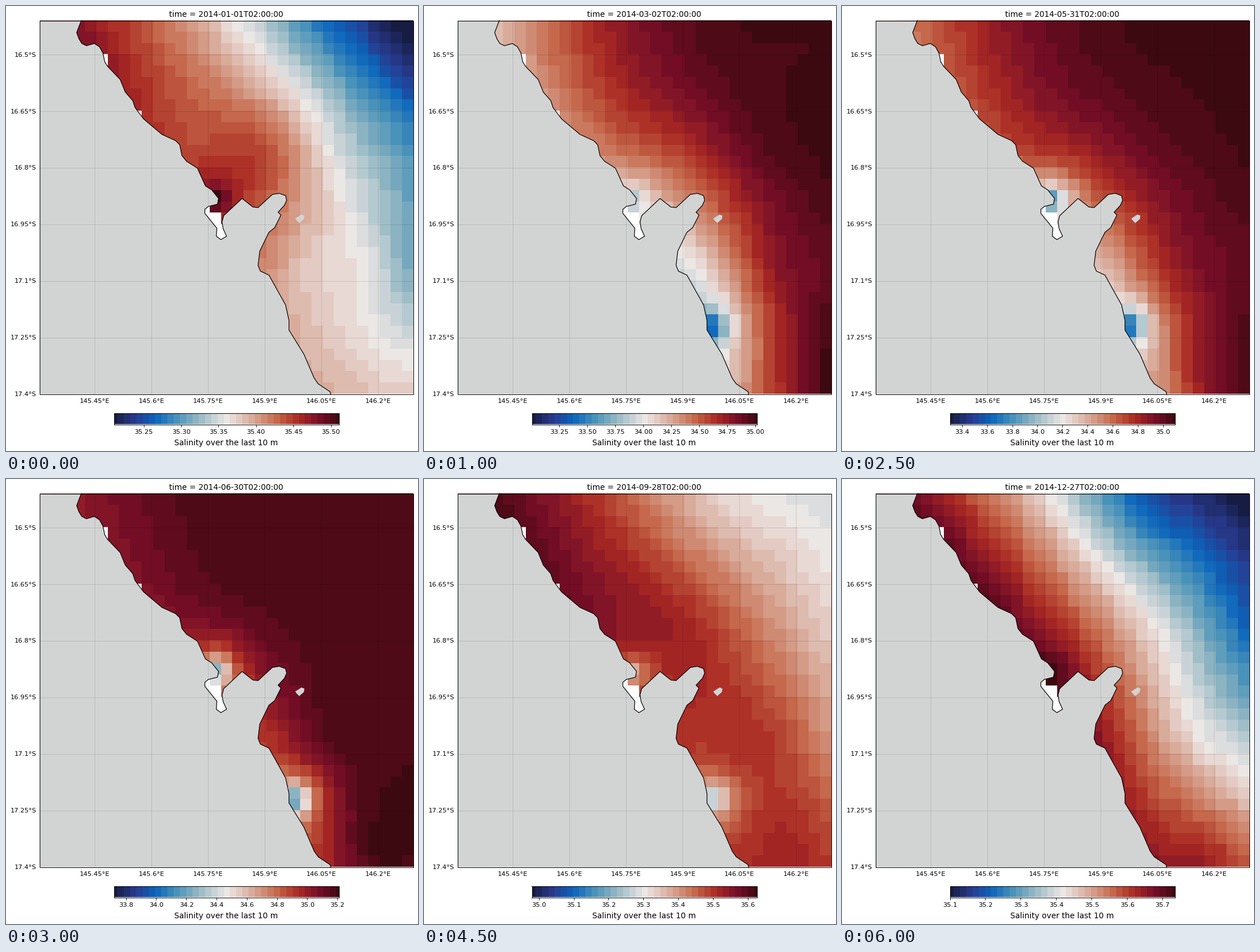
Recreate the animation shown at these times as a matplotlib script. Size 720 px wide and 778 px high, loop 6.5 s.

```python
import numpy as np
import matplotlib.pyplot as plt
from matplotlib.animation import FuncAnimation
from matplotlib.colors import LinearSegmentedColormap
from matplotlib.path import Path

W, H, DPI = 720, 778, 100
PT = 72 / DPI                      # points per pixel
LEFT, RIGHT, TOP, BOTTOM = 58.5, 711.5, 25.5, 678.5
N = 33                             # cells per side
DEGREE = (RIGHT - LEFT) / 0.99     # pixels per degree
SHADES = 36
FRAMES, INTERVAL = 13, 500
LAND = "#d2d4d3"
START = np.datetime64("2014-01-01T02:00:00")

plt.rcParams["font.family"] = "DejaVu Sans"

# Diverging navy - white - maroon map
COOL = ["#171c42", "#293a8f", "#0b66bd", "#4590b9", "#8eb5c2", "#d2d8db"]
WARM = ["#e6d2cc", "#d59d89", "#c46548", "#ac2b24", "#780e28", "#3c0911"]
stops = [(i / 11, c) for i, c in enumerate(COOL)]
stops += [(0.5, "#ece8e6")]
stops += [((i + 6) / 11, c) for i, c in enumerate(WARM)]
CMAP = LinearSegmentedColormap.from_list("balance", stops, N=256)
CMAP.set_bad("white")

COAST = np.array([
    (131, 25), (123, 46), (127, 57), (132, 65), (140, 69), (154, 65), (163, 71), (169, 82),
    (172, 97), (177, 105), (199, 128), (208, 150), (221, 165), (225, 177), (240, 197),
    (272, 224), (296, 235), (303, 242), (307, 261), (315, 271), (334, 283), (348, 314),
    (359, 321), (371, 336), (369, 346), (353, 350), (347, 355), (347, 362), (368, 388),
    (367, 402), (375, 408), (385, 402), (379, 389), (377, 377), (380, 366), (412, 336),
    (431, 351), (440, 352), (465, 329), (477, 327), (488, 331), (490, 339), (486, 348),
    (475, 360), (480, 365), (469, 387), (459, 395), (443, 428), (440, 453), (444, 463),
    (459, 470), (488, 522), (494, 549), (494, 566), (520, 608), (538, 650), (545, 660),
    (566, 674), (567, 679)]) + 0.5
ISLAND = np.array([(505, 371), (516, 364), (521, 366), (520, 372), (512, 379), (507, 374)]) + 0.5
MAINLAND = np.vstack([COAST, (LEFT, BOTTOM), (LEFT, TOP)])

# Cells without data: two slivers and the inlet
empty = np.zeros((N, N), bool)
empty[3, 5] = empty[8, 8] = empty[16, 14] = True
empty[17, 13:16] = True
empty[18:21, 13:17] = True

# A cell holds water when any of its corners is off the land
edge = np.linspace(0, RIGHT - LEFT, N + 1)
corners = np.stack(np.meshgrid(LEFT + edge, TOP + edge), -1).reshape(-1, 2)
wet = ~Path(MAINLAND).contains_points(corners).reshape(N + 1, N + 1)
ocean = (wet[1:, 1:] | wet[:-1, 1:] | wet[1:, :-1] | wet[:-1, :-1]) & ~empty

# Control net: four rows, four steps from the shore to the eastern edge
rows = np.repeat([1, 11, 21, 31], 4)
shore = 3 + 1.03 * rows - 0.01 * rows ** 2
POINTS = np.c_[shore + (32 - shore) * np.tile(np.arange(4) / 3, 4), rows]
GRID = np.stack(np.meshgrid(np.arange(N), np.arange(N)), -1).reshape(-1, 2).astype(float)


def kernel(a, b):
    d2 = ((a[:, None] - b[None]) ** 2).sum(-1)
    return d2 * np.log(d2 + 1e-9)


def spline(values):
    """Thin-plate surface through the control net."""
    n = len(POINTS)
    base = np.c_[np.ones(n), POINTS]
    system = np.block([[kernel(POINTS, POINTS), base], [base.T, np.zeros((3, 3))]])
    w = np.linalg.solve(system, np.r_[values, np.zeros(3)])
    return kernel(GRID, POINTS) @ w[:n] + np.c_[np.ones(len(GRID)), GRID] @ w[n:]


def plume(col, row):
    return np.exp(-np.hypot(GRID[:, 0] - col, GRID[:, 1] - row) / 1.4)


INLET, RIVER = plume(15, 15.3), plume(22, 26.5)
steps, lows, salts = [], [], []


def key(step, low, high, inlet, river, *net):
    """Salinity at one step; net, inlet and river are percent of the colour range."""
    level = spline(np.ravel(net)) + inlet * INLET + river * RIVER
    steps.append(step)
    lows.append(low)
    salts.append(low + (high - low) * np.clip(level / 100, 0, 1).reshape(N, N))


key(0, 35.21, 35.524, 26, 0,
    (84, 62, 30, 0), (73, 73, 45, 27), (62, 52, 48, 32), (56, 55, 51, 51))
key(1, 33.54, 35.295, 0, -60,
    (68, 81, 87, 87), (73, 78, 90, 91), (66, 81, 93, 93), (85, 92, 97, 100))
key(3, 32.47, 34.926, -35, -35,
    (52, 82, 98, 100), (64, 75, 90, 98), (37, 59, 80, 87), (50, 66, 78, 92))
key(6, 33.72, 35.224, -62, -68,
    (87, 96, 97, 97), (91, 95, 97, 97), (83, 95, 97, 97), (85, 95, 99, 98))
key(8, 34.70, 35.523, -58, -72,
    (98, 94, 78, 73), (95, 96, 88, 78), (88, 94, 90, 78), (96, 97, 94, 90))
key(10, 35.26, 35.737, 5, -18,
    (93, 49, 17, 2), (79, 62, 36, 15), (68, 61, 55, 45), (55, 61, 62, 58))
key(12, 35.10, 35.735, 12, 0,
    (91, 61, 20, 1), (89, 68, 44, 18), (83, 66, 51, 41), (84, 84, 80, 72))


def shade(values):
    return np.round(values * SHADES) / SHADES


def state(step):
    """Colour range and shaded field, with salinity blended between keys."""
    k = min(np.searchsorted(steps, step, side="right"), len(steps) - 1) - 1
    t = (step - steps[k]) / (steps[k + 1] - steps[k])
    low = (1 - t) * lows[k] + t * lows[k + 1]
    salt = (1 - t) * salts[k] + t * salts[k + 1]
    high = salt[ocean].max()
    level = np.clip((salt - low) / (high - low), 0, 1)
    return low, high, np.ma.masked_array(shade(level), empty)


fig = plt.figure(figsize=(W / DPI, H / DPI), dpi=DPI, facecolor="white")
ax = fig.add_axes([0, 0, 1, 1])
ax.axis("off")

mesh = ax.imshow(np.zeros((N, N)), cmap=CMAP, vmin=0, vmax=1, aspect="auto",
                 interpolation="nearest", extent=(LEFT, RIGHT, BOTTOM, TOP))
ax.set_xlim(0, W)
ax.set_ylim(H, 0)

for land in (MAINLAND, ISLAND):
    ax.fill(*land.T, color=LAND, lw=0)
ax.plot(*COAST.T, color="black", lw=1.2 * PT, solid_joinstyle="round")

TICK, TITLE = 11.35 * PT, 13.6 * PT
CENTER = (LEFT + RIGHT) / 2
grid = dict(color="black", alpha=0.13, lw=0.9 * PT)


def degrees(value, side):
    return f"{value:.2f}".rstrip("0") + "°" + side


for i in range(6):
    x = 155.3 + 0.15 * i * DEGREE
    ax.plot([x, x], [TOP, BOTTOM], **grid)
    ax.text(x, 694.5, degrees(145.45 + 0.15 * i, "E"), size=TICK, ha="center")
for i in range(7):
    y = BOTTOM - 0.15 * i * DEGREE
    if i:
        ax.plot([LEFT, RIGHT], [y, y], **grid)
    ax.text(53.3, y + 3.7, degrees(17.4 - 0.15 * i, "S"), size=TICK, ha="right")
ax.plot([LEFT, RIGHT, RIGHT, LEFT, LEFT], [TOP, TOP, BOTTOM, BOTTOM, TOP],
        color="black", lw=0.95 * PT, solid_joinstyle="miter")

title = ax.text(CENTER, 18.7, "", size=TITLE, ha="center")
ax.text(CENTER, 768, "Salinity over the last 10 m", size=TITLE, ha="center")

bar = fig.add_axes([188.5 / W, 1 - 731.5 / H, 393.5 / W, 19.5 / H])
bar.imshow(shade(np.linspace(0, 1, 394))[None], cmap=CMAP, vmin=0, vmax=1, aspect="auto",
           interpolation="nearest", extent=(0, 1, 0, 1), transform=bar.transAxes)
bar.set_yticks([])
bar.ticklabel_format(axis="x", useOffset=False)
bar.tick_params(axis="x", length=4 * PT, width=0.95 * PT, pad=4 * PT, labelsize=TICK)
for spine in bar.spines.values():
    spine.set_linewidth(0.95 * PT)


def update(step):
    low, high, field = state(step)
    mesh.set_data(field)
    bar.set_xlim(low, high)
    title.set_text(f"time = {START + np.timedelta64(30 * step, 'D')}")
    return mesh, title


anim = FuncAnimation(fig, update, frames=FRAMES, interval=INTERVAL, repeat=True,
                     repeat_delay=0, blit=False)
plt.show()
```
